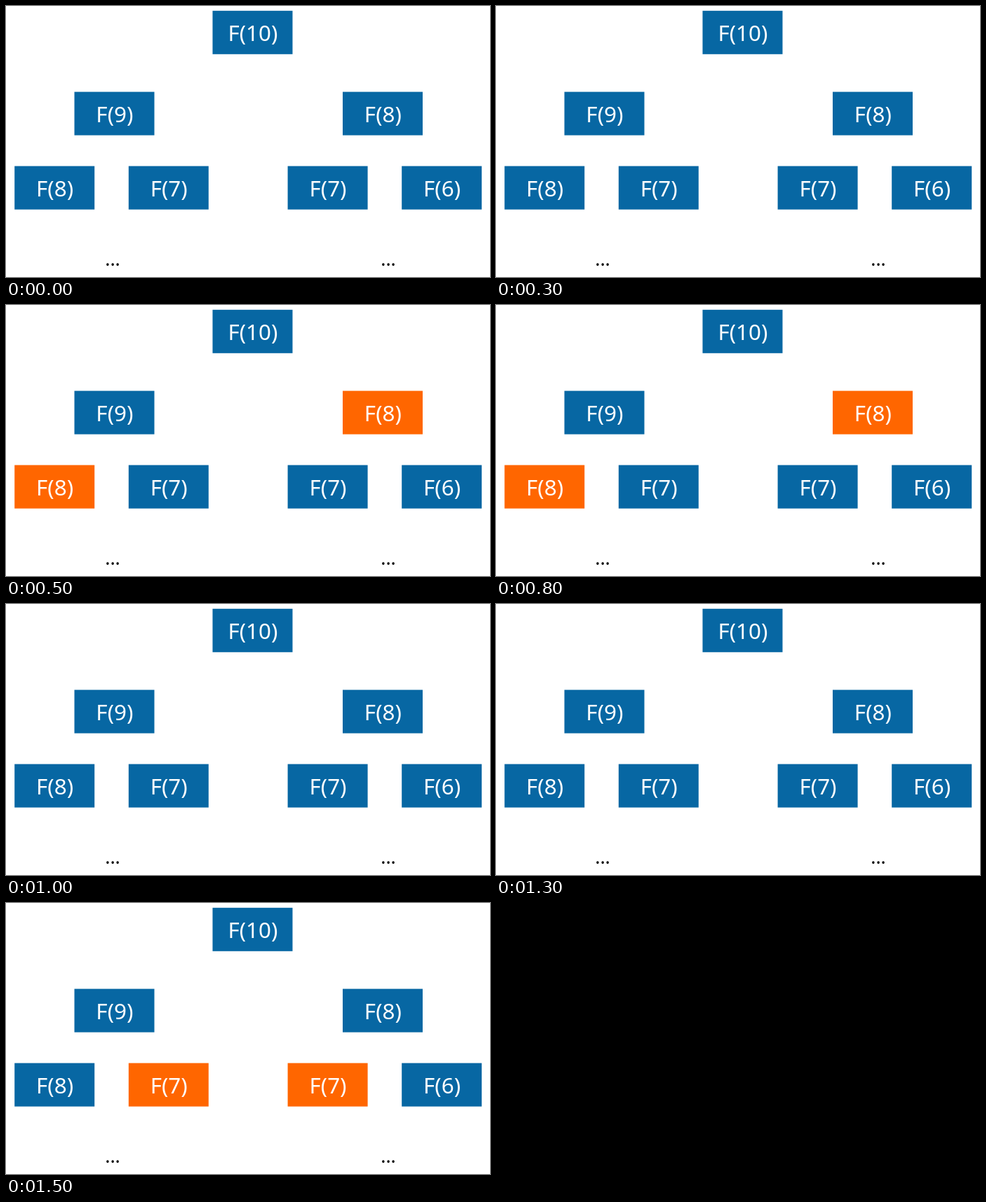
An HTML page that plays this animation: 690 px wide and 387 px high, repeating every 2000 ms.

```html
<!DOCTYPE html>
<html lang="en">
<head>
<meta charset="utf-8">
<title>Recursive call tree</title>
<style>
  html, body { margin: 0; width: 100%; height: 100%; overflow: hidden; background: #fff; }
  svg { display: block; width: 690px; height: 387px; }
  text { font: 31.4px "Noto Sans", "Open Sans", sans-serif; text-anchor: middle; fill: #fff; }
  .dots { font-size: 27px; fill: #000; }
</style>
</head>
<body>
<svg id="tree" viewBox="0 0 690 387"></svg>
<script>
const BLUE = "#0767a3", ORANGE = "#ff6600";
const PHASE = 500;
const WIDTH = 114, HEIGHT = 62, ROW = 106, SIBLING_GAP = 162.6;
const ROOT_Y = 6.8, BRANCH_Y = 122.6;

const tree = document.getElementById("tree");
const nodes = [];

function add(tag, attributes, content = "") {
  const element = document.createElementNS("http://www.w3.org/2000/svg", tag);
  for (const name in attributes) element.setAttribute(name, attributes[name]);
  element.textContent = content;
  return tree.appendChild(element);
}

function addCall(n, x, y) {
  const box = add("rect", { x: x - WIDTH / 2, y, width: WIDTH, height: HEIGHT });
  add("text", { x: x + 0.4, y: y + 43 }, `F(${n})`);
  nodes.push({ n, box });
}

// A call, the two calls it makes, and dots for the deeper levels.
function addBranch(n, x, firstChildX, dotsX) {
  addCall(n, x, BRANCH_Y);
  for (const i of [0, 1]) addCall(n - 1 - i, firstChildX + i * SIBLING_GAP, BRANCH_Y + ROW);
  add("text", { class: "dots", x: dotsX, y: 371 }, "...");
}

addCall(10, 351.5, ROOT_Y);
addBranch(9, 154.5, 69.2, 152);
addBranch(8, 537, 458.6, 545);

// Every odd phase lights the repeated calls: first F(8), then F(7).
function draw(now) {
  const phase = Math.floor(now / PHASE) % 4;
  const lit = phase % 2 ? 8 - (phase >> 1) : null;
  for (const { n, box } of nodes) box.setAttribute("fill", n === lit ? ORANGE : BLUE);
}

function tick() {
  draw(performance.now());
  requestAnimationFrame(tick);
}
tick();
</script>
</body>
</html>
```
